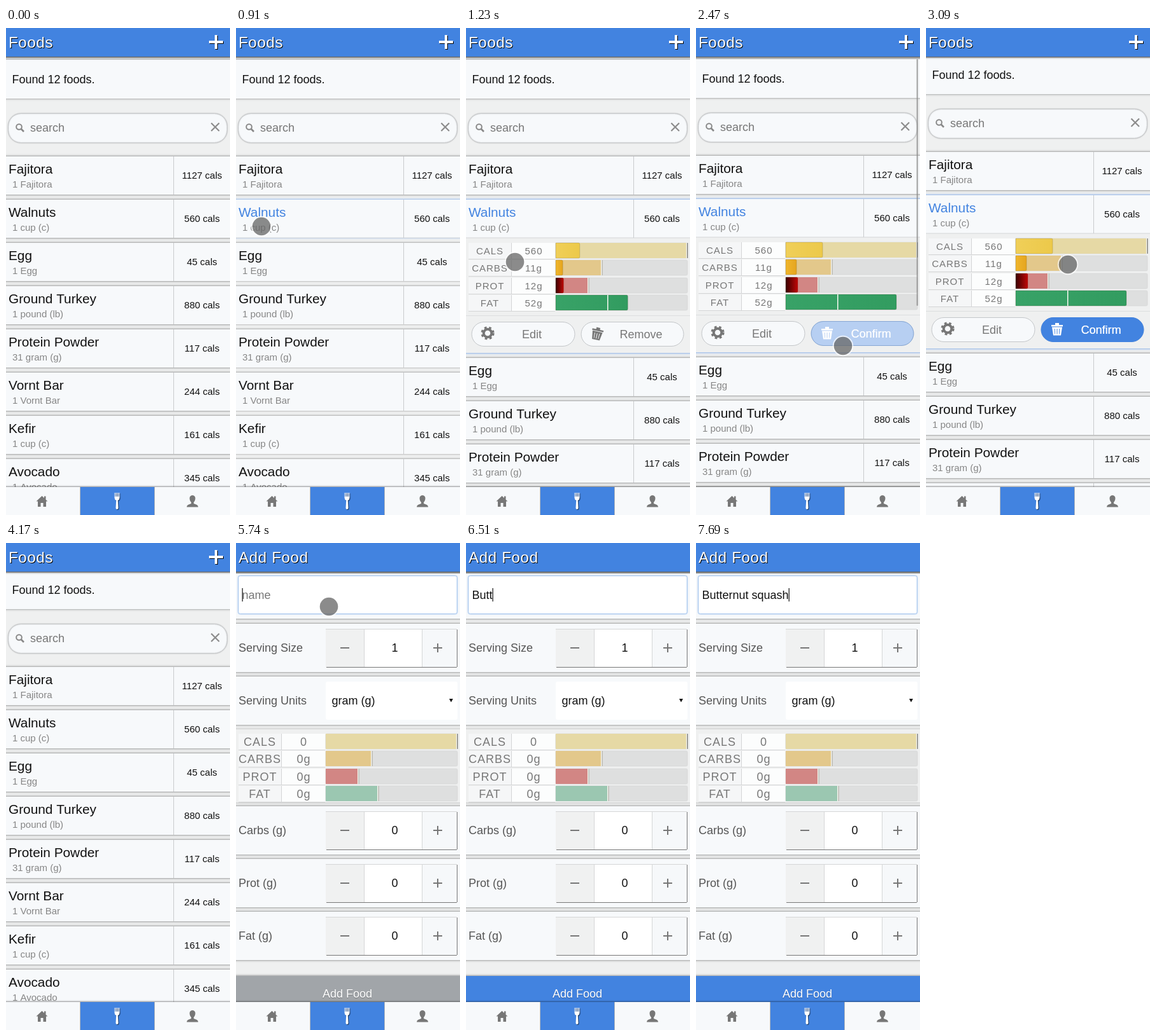
Animation, 352 px wide and 766 px high, one loop 8000 ms. Source, as an HTML page with a canvas:

```html
<!DOCTYPE html>
<html lang="en">
<head>
<meta charset="utf-8">
<title>Foods</title>
<style>
  html, body { margin: 0; width: 100%; height: 100%; overflow: hidden; background: #eff1f1; }
  canvas { display: block; width: 352px; height: 766px; }
</style>
</head>
<body>
<canvas id="stage"></canvas>
<script>
const W = 352, H = 766, LOOP = 8000;
const BLUE = '#4283e0', PANEL = '#f7f9fb', PAGE = '#eff0f0', GREY = '#777';
const DRAWER = 181, SCROLL = 7;
const canvas = document.getElementById('stage');
const c = canvas.getContext('2d');
const ratio = window.devicePixelRatio || 1;
canvas.width = W * ratio;
canvas.height = H * ratio;

const foods = [
  ['Fajitora', '1 Fajitora', 1127], ['Walnuts', '1 cup (c)', 560], ['Egg', '1 Egg', 45],
  ['Ground Turkey', '1 pound (lb)', 880], ['Protein Powder', '31 gram (g)', 117],
  ['Vornt Bar', '1 Vornt Bar', 244], ['Kefir', '1 cup (c)', 161], ['Avocado', '1 Avocado', 345]
];
// label, value, goal width, filled width, goal colour, fill colours
const nutrients = [
  ['CALS', '560', 205, 58, '#e6d9a5', '#f0cf58', '#ecc94a'],
  ['CARBS', '11g', 71, 17, '#e3c88b', '#f0b62c', '#e5a51f'],
  ['PROT', '12g', 50, 19, '#d28684', '#3a0000', '#c00808'],
  ['FAT', '52g', 81, 174, '#9bc7b1', '#38a267', '#329c60']
];
// time, x, y
const pointerPath = [
  [70, 265, 785], [760, 40, 312], [910, 40, 312], [1230, 77, 368], [1690, 40, 521],
  [1770, 42, 520], [1920, 228, 488], [2320, 228, 488], [2470, 231, 500], [3090, 223, 372],
  [3160, 222, 369], [3390, 194, 299], [3640, 194, 299], [4120, 372, 162], [4270, 372, 42],
  [4490, 335, 22], [4720, 335, 22], [5190, 146, 100], [5900, 146, 100]
];
const typed = 'Butternut squash';
const keyTimes = [5890, 5970, 6130, 6510, 6660, 6740, 6740, 6910, 6980, 7060, 7130,
  7300, 7370, 7540, 7610, 7690];

const ramp = (t, from, to) => Math.max(0, Math.min(1, (t - from) / (to - from)));
const smooth = p => p * p * (3 - 2 * p);
const easeOut = p => 1 - (1 - p) ** 2;

function rect(x, y, w, h, fill) {
  c.fillStyle = fill;
  c.fillRect(x, y, w, h);
}

function rounded(x, y, w, h, r, fill, stroke, width = 1) {
  c.beginPath();
  c.roundRect(x, y, w, h, r);
  c.fillStyle = fill;
  c.fill();
  if (stroke) {
    c.strokeStyle = stroke;
    c.lineWidth = width;
    c.stroke();
  }
}

function shadow(color, blur, dx, dy, draw) {
  c.save();
  c.shadowColor = color;
  c.shadowBlur = blur * ratio;
  c.shadowOffsetX = dx * ratio;
  c.shadowOffsetY = dy * ratio;
  draw();
  c.restore();
}

function text(str, x, y, size, color, align = 'left', spacing = 0) {
  c.font = `${size}px "Liberation Sans", Arial, sans-serif`;
  c.letterSpacing = spacing + 'px';
  c.textAlign = align;
  c.fillStyle = color;
  c.fillText(str, x, y);
}

function lines(color, width, ...segments) {
  c.strokeStyle = color;
  c.lineWidth = width;
  c.beginPath();
  for (const [x1, y1, x2, y2] of segments) {
    c.moveTo(x1, y1);
    c.lineTo(x2, y2);
  }
  c.stroke();
}

const plus = (x, y, r, color, width) =>
  lines(color, width, [x - r, y, x + r, y], [x, y - r, x, y + r]);

function icon(path, x, y, color, angle = 0) {
  c.save();
  c.translate(x, y);
  c.rotate(angle);
  c.fillStyle = color;
  c.fill(new Path2D(path), 'evenodd');
  c.restore();
}

function panel(y, h, glow = 'rgba(0,0,0,.6)', fill = PANEL) {
  shadow(glow, 3.5, 0, 0, () => rect(-6, y, W + 12, h, fill));
}

function gear(x, y) {
  c.strokeStyle = GREY;
  c.lineWidth = 4;
  c.beginPath();
  c.arc(x, y, 6.3, 0, 7);
  c.stroke();
  c.setLineDash([3.53, 3.53]);
  c.beginPath();
  c.arc(x, y, 8.6, 0, Math.PI * 2);
  c.stroke();
  c.setLineDash([]);
}

const trash = (x, y, color, angle) => icon(
  'M-9-7H-3V-10H3V-7H9V-4.5H-9ZM-8-3.5H8L6 9.5H-6ZM-4.3-1L-3.8 7.5H-3L-3.3-1ZM-.5-1V7.5H.5V-1ZM3.3-1L3 7.5H3.8L4.3-1Z',
  x, y, color, angle);

function nutrientBars(y, size, fill) {
  nutrients.forEach(([label, value, goal, amount, goalColor, from, to], i) => {
    const top = Math.round(y + i * 27.4), baseline = top + 12.5 + size * .36;
    rect(4, top, 67, 25, '#f5f6f7');
    rect(72, top, 68, 25, '#fcfdfd');
    lines('#d4d5d6', 1, [4, top + 25.5, 140, top + 25.5], [71.5, top, 71.5, top + 25]);
    text(label, 37.5, baseline, size, GREY, 'center', 1);
    const shown = fill === null ? value.replace(/\d+/, '0') : value;
    text(shown, 106.5, baseline, size, GREY, 'center', 1);
    rounded(141, top, 207, 24, 2, '#dedfdf', '#d2d2d2', .6);
    rect(141, top, goal, 24, goalColor);
    const w = amount * (fill || 0);
    if (w > 0) {
      const paint = c.createLinearGradient(141, 0, 141 + w, 0);
      paint.addColorStop(0, from);
      paint.addColorStop(1, to);
      rounded(141, top, w, 24, [0, 2, 2, 0], paint, 'rgba(60,50,20,.3)', .6);
    }
    rect(141 + goal, top, 1.5, 24, '#fbfbf4');
    if (w < goal) rect(142.5 + goal, top, 1, 24, i ? '#a5a59c' : '#55554c');
  });
}

function drawer(y, t) {
  const confirm = ramp(t, 2320, 2750), confirming = t >= 2320;
  nutrientBars(y + 68, 15, easeOut(ramp(t, 1010, 1550)));
  lines('#dcdedf', 1, [0, y + 182.5, W, y + 182.5]);
  rounded(9, y + 192.5, 162, 38, 19, PANEL, '#c3c6c9');
  gear(34, y + 210);
  text('Edit', 103.5, y + 218, 18, GREY, 'center');
  rounded(181, y + 192.5, 161, 38, 19, PANEL, '#c3c6c9');
  c.save();
  c.globalAlpha = confirm;
  rounded(181, y + 192.5, 161, 38, 19, BLUE, BLUE);
  c.restore();
  const ink = confirming ? '#fff' : GREY;
  trash(206, y + 211, ink, confirming ? 0 : .22);
  shadow(confirming ? 'rgba(255,255,255,.6)' : 'transparent', 0, .5, 0, () =>
    text(confirming ? 'Confirm' : 'Remove', 275, y + 218, 18, ink, 'center'));
}

function foodRow([name, serving, cals], y, open, t) {
  const active = open > 0;
  if (active) {
    panel(y, 60 + DRAWER * open, BLUE, PAGE);
    c.save();
    c.beginPath();
    c.rect(0, y, W, 60 + DRAWER * open);
    c.clip();
    drawer(y, t);
    c.restore();
    rect(0, y, W, 60, PANEL);
    lines('#d4d6d8', 1, [0, y + 60, W, y + 60]);
  } else {
    panel(y, 60);
  }
  lines('#c9cbcd', 1, [263.5, y, 263.5, y + 60]);
  text(name, 4, y + 26.5, 20.8, active ? BLUE : '#111');
  text(serving, 10, y + 49, 15, '#868686');
  text(cals + ' cals', 308, y + 35, 15, '#111', 'center');
}

function foodsPage(t) {
  const scroll = Math.round(smooth(ramp(t, 2380, 2800)) * SCROLL);
  const open = smooth(ramp(t, 910, 1190)) - smooth(ramp(t, 3640, 3930));
  rect(0, 0, W, H, PAGE);
  c.save();
  c.translate(0, -scroll);
  panel(50, 61, 'rgba(0,0,0,.5)');
  text('Found 12 foods.', 9.5, 87, 18, '#111');

  shadow('rgba(0,0,0,.2)', 2, 0, 0, () => rounded(3.5, 134.5, 344, 46, 20, PANEL, '#c6c8ca'));
  c.strokeStyle = '#888';
  c.lineWidth = 2;
  c.beginPath();
  c.arc(20.5, 155.5, 4.3, 0, 7);
  c.stroke();
  lines('#888', 2.6, [23.5, 158.5, 28, 163]);
  text('search', 38, 163, 18, GREY);
  lines('#8c8c8c', 2.2, [322.5, 149.5, 335, 162], [335, 149.5, 322.5, 162]);

  foods.forEach((food, i) =>
    foodRow(food, 202 + 68 * i + (i > 1 ? DRAWER * open : 0), i === 1 ? open : 0, t));
  c.restore();

  c.globalAlpha = .65 * ramp(t, 2320, 2400) * (1 - ramp(t, 2850, 3090));
  rounded(346.5, 49, 2.5, 388, 1.2, '#888');
  c.globalAlpha = 1;
}

function field(label, y, value) {
  panel(y, 76);
  text(label, 4, y + 44, 18, '#555');
  if (value === undefined) return;
  rect(141, y + 8, 207, 60, '#fff');
  rect(141, y + 8, 60, 60, '#f0f1f1');
  rect(292, y + 8, 55, 60, '#f6f8fa');
  lines('#d5d6d7', 1, [201.5, y + 8, 201.5, y + 68], [292.5, y + 8, 292.5, y + 68], [141, y + 8.5, 347, y + 8.5]);
  lines('#777', 1, [142, y + 68.5, 347, y + 68.5], [347.5, y + 9, 347.5, y + 68]);
  lines('#777', 2, [164, y + 38, 178, y + 38]);
  plus(317, y + 38, 7, '#777', 2);
  text(value, 249.5, y + 44, 18, '#111', 'center');
}

function addPage(t) {
  rect(0, 0, W, H, PAGE);
  panel(48, 71);
  shadow('rgba(90,150,230,.4)', 2, 0, 0, () => rounded(3.5, 51.5, 344, 60, 3, '#fff', '#a9c8ee'));
  const name = typed.slice(0, keyTimes.filter(k => k <= t).length);
  text(name || 'name', 9.5, 88, 18, name ? '#111' : GREY);
  if (t >= 5740) rect(9.5 + (name ? c.measureText(name).width : 0), 71, 1.2, 21, '#111');

  field('Serving Size', 127, '1');
  field('Serving Units', 210);
  rounded(141, 218, 207, 60, 3, '#fff');
  text('gram (g)', 150.5, 254, 18, '#111');
  icon('M-3-2.5H3L0 3Z', 338, 247.5, '#111');

  panel(293, 115, 'rgba(0,0,0,.3)', PAGE);
  nutrientBars(300, 18, null);
  field('Carbs (g)', 414, '0');
  field('Prot (g)', 497, '0');
  field('Fat (g)', 580, '0');

  panel(681, 60, 'rgba(0,0,0,.6)', '#a1a5a9');
  c.save();
  c.globalAlpha *= ramp(t, 5870, 6100);
  rect(0, 681, W, 60, BLUE);
  c.restore();
  shadow('rgba(0,0,0,.3)', 1, 0, 1, () => text('Add Food', 175, 715, 18, '#fff', 'center'));
}

function header(adding) {
  shadow('rgba(0,0,0,.9)', 3, 0, 1, () => rect(-6, -6, W + 12, 51, BLUE));
  shadow('#000', 0, 1, 1, () => {
    text(adding ? 'Add Food' : 'Foods', 4, 31, 24, '#fff', 'left', .7);
    if (!adding) plus(330, 22, 11, '#fff', 4);
  });
}

function tabBar() {
  shadow('rgba(0,0,0,.8)', 3, 0, 0, () => rect(-6, 722, W + 12, 50, PANEL));
  rect(117, 722, 116, 44, BLUE);
  lines('#b5b8bb', 1, [116.5, 722, 116.5, H], [233.5, 722, 233.5, H]);
  icon('M-9 0L0-8.5L3.5-5.2V-8H6V-2.8L9 0H6.5V8.5H2V2.5H-2V8.5H-6.5V0Z', 56.5, 744.5, GREY);
  shadow('rgba(0,0,0,.6)', 1, 1, 1, () => icon(
    'M-4-13H-3V-7H-2V-13H-.6V-7H.6V-13H2V-7H3V-13H4V-5Q4-2 1.3-1L2 11Q2 13 0 13Q-2 13-2 11L-1.3-1Q-4-2-4-5Z',
    174.5, 744, '#fff'));
  icon('M-4.5-5C-4.5-11 4.5-11 4.5-5C4.5-2 3.5 0 2 1.5V3.5L7 5.5Q9 6.5 9 9H-9Q-9 6.5-7 5.5L-2 3.5V1.5C-3.5 0-4.5-2-4.5-5Z',
    293, 744.5, GREY);
}

function pointer(t) {
  const next = pointerPath.findIndex(p => p[0] > t);
  if (next < 1) return;
  const [t0, x0, y0] = pointerPath[next - 1], [t1, x1, y1] = pointerPath[next];
  const p = smooth(ramp(t, t0, t1));
  const x = x0 + (x1 - x0) * p, y = y0 + (y1 - y0) * p;
  c.beginPath();
  c.arc(x, y, 15.2, 0, 7);
  c.strokeStyle = 'rgba(255,255,255,.7)';
  c.lineWidth = 2;
  c.stroke();
  c.beginPath();
  c.arc(x, y, 14.3, 0, 7);
  c.fillStyle = 'rgba(102,102,102,.76)';
  c.fill();
}

function frame() {
  const t = performance.now() % LOOP;
  const adding = ramp(t, 4760, 5060);
  c.setTransform(ratio, 0, 0, ratio, 0, 0);
  if (adding < 1) foodsPage(t);
  if (adding > 0) {
    c.globalAlpha = adding;
    addPage(t);
    c.globalAlpha = 1;
  }
  header(adding > 0);
  tabBar();
  pointer(t);
  requestAnimationFrame(frame);
}
frame();
</script>
</body>
</html>
```
